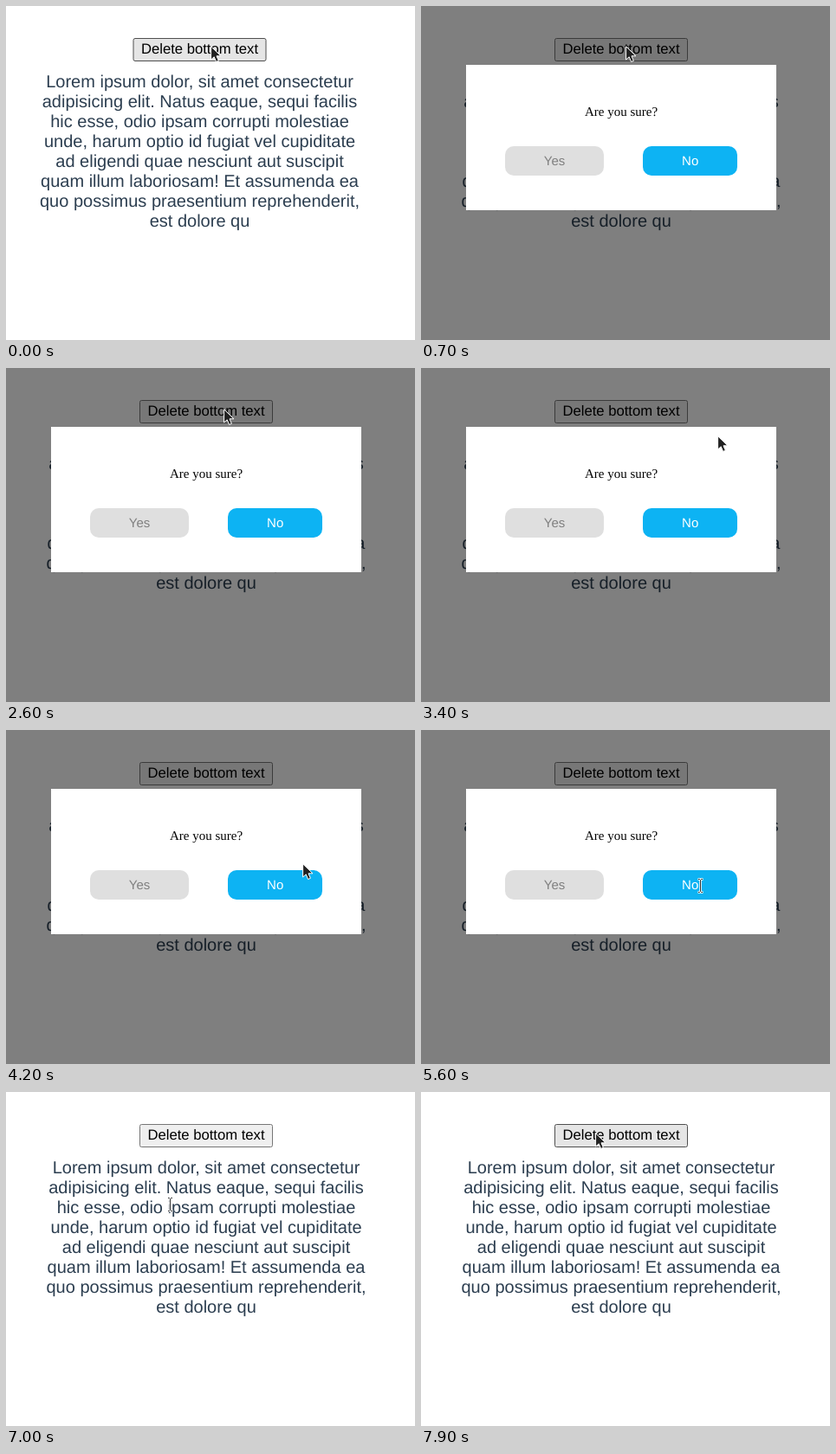
An HTML page that plays this animation: 472x386 px, repeating every 8 s.

```html
<!DOCTYPE html>
<html lang="en">
<head>
<meta charset="utf-8">
<style>
  html, body { margin: 0; width: 100%; height: 100%; overflow: hidden; background: #fff; }
  svg { display: block; width: 472px; height: 386px; }
  text {
    font-family: "Liberation Sans", Arial, sans-serif;
    text-anchor: middle;
    text-rendering: geometricPrecision;
    white-space: pre;
  }
  #lines text { font-size: 20px; fill: #2c3e50; }
  #trigger rect { fill: #efefef; stroke: #767676; }
  #trigger.hover rect { fill: #e5e5e5; stroke: #4f4f4f; }
  #trigger text { font-size: 16.667px; }
  #dialog text { font-size: 15px; }
  #dialog .question { font-family: "Liberation Serif", "Times New Roman", serif; }
  .pointer { fill: #222; stroke: #fff; stroke-linejoin: round; }
  #beam { fill: none; }
</style>
</head>
<body>
<svg viewBox="0 0 472 386">
  <g id="page">
    <g id="trigger">
      <rect x="154.5" y="37.5" width="153" height="26" rx="2"/>
      <text x="231" y="55">Delete bottom text</text>
    </g>
    <g id="lines"></g>
  </g>
  <g id="dialog">
    <rect width="472" height="386" fill-opacity=".5"/>
    <rect x="52" y="68" width="358" height="168" fill="#fff"/>
    <text class="question" x="231" y="127">Are you sure?</text>
    <rect x="97" y="162" width="114" height="34" rx="10" fill="#dfdfdf"/>
    <text x="154" y="184" fill="#808080">Yes</text>
    <rect x="256" y="162" width="109" height="34" rx="10" fill="#0db3f3"/>
    <text x="310.7" y="184" fill="#fff">No</text>
  </g>
  <g id="cursor">
    <path id="arrow" class="pointer" d="M.6 .8V16L4.2 12.8L6.6 18.5L9.4 17.3L7 11.8H12Z"/>
    <path id="hand" class="pointer" d="M-1.5 9V-.5a1.5 1.5 0 0 1 3 0V5l7 1.5q2 .5 2 2.5v3l-2 4.5h-8l-5-6q-1.5-2 0-2.5 1-.3 3 1z"/>
    <g id="beam">
      <path d="M-3.5-7.5H2.5M-.5-7.5V7.5M-3.5 7.5H2.5" stroke="#fff" stroke-width="2.6"/>
      <path d="M-3-7.5H-1.5L-.5-6.5L.5-7.5H2M-.5-6.5V6.5M-3 7.5H-1.5L-.5 6.5L.5 7.5H2" stroke="#333"/>
    </g>
  </g>
</svg>
<script>
const LOOP = 8000, STEP = 100;
const $ = id => document.getElementById(id);

const lines = [
  'Lorem ipsum dolor, sit amet consectetur',
  'adipisicing elit. Natus eaque, sequi facilis',
  'hic esse, odio ipsam corrupti molestiae',
  'unde, harum optio id fugiat vel cupiditate',
  'ad eligendi quae nesciunt aut suscipit',
  'quam illum laboriosam! Et assumenda ea',
  'quo possimus praesentium reprehenderit,',
  'est dolore qu'
];
lines.forEach((line, i) => {
  const text = document.createElementNS('http://www.w3.org/2000/svg', 'text');
  text.setAttribute('x', 231);
  text.setAttribute('y', 94 + 23 * i);
  text.textContent = line;
  $('lines').append(text);
});

// Cursor hotspot: [time, x, y]
const path = [
  [0, 236, 46], [1600, 236, 46], [1700, 249, 46], [1800, 246, 46],
  [2000, 246, 46], [2300, 251, 46], [2600, 251, 47],
  [3000, 295, 57], [3400, 342, 78], [3600, 356, 91], [3800, 361, 108],
  [4000, 356, 131], [4200, 342, 154], [4300, 334, 167], [4500, 323, 180],
  [4800, 323, 180], [4900, 324, 179], [5500, 324, 179], [5600, 323, 180],
  [6400, 323, 180], [6600, 300, 190], [6800, 245, 175], [7000, 190, 130],
  [7200, 169, 90], [7300, 169, 73], [7400, 176, 62], [7600, 190, 54],
  [7900, 201, 47]
];

function cursorAt(t) {
  const i = path.findIndex(key => key[0] > t);
  if (i < 0) return path.at(-1).slice(1);
  const [t0, x0, y0] = path[i - 1], [t1, x1, y1] = path[i];
  const k = (t - t0) / (t1 - t0);
  return [Math.round(x0 + (x1 - x0) * k), Math.round(y0 + (y1 - y0) * k)];
}

const show = (id, on) => { $(id).style.display = on ? '' : 'none'; };

function draw(now) {
  const t = Math.floor(now % LOOP / STEP) * STEP;
  const within = (from, to) => t >= from && t < to;
  const hand = within(4300, 5600), beam = within(5600, 7300);
  show('dialog', within(700, 5700));
  show('hand', hand);
  show('beam', beam);
  show('arrow', !hand && !beam);
  // The page sits further left until the dialog hides the scrollbar
  $('page').setAttribute('transform', `translate(${t < 700 ? -7.5 : 0})`);
  $('trigger').setAttribute('class', t < 700 || t >= 7400 ? 'hover' : '');
  $('cursor').setAttribute('transform', `translate(${cursorAt(t)})`);
  requestAnimationFrame(draw);
}
draw(performance.now());
</script>
</body>
</html>
```
